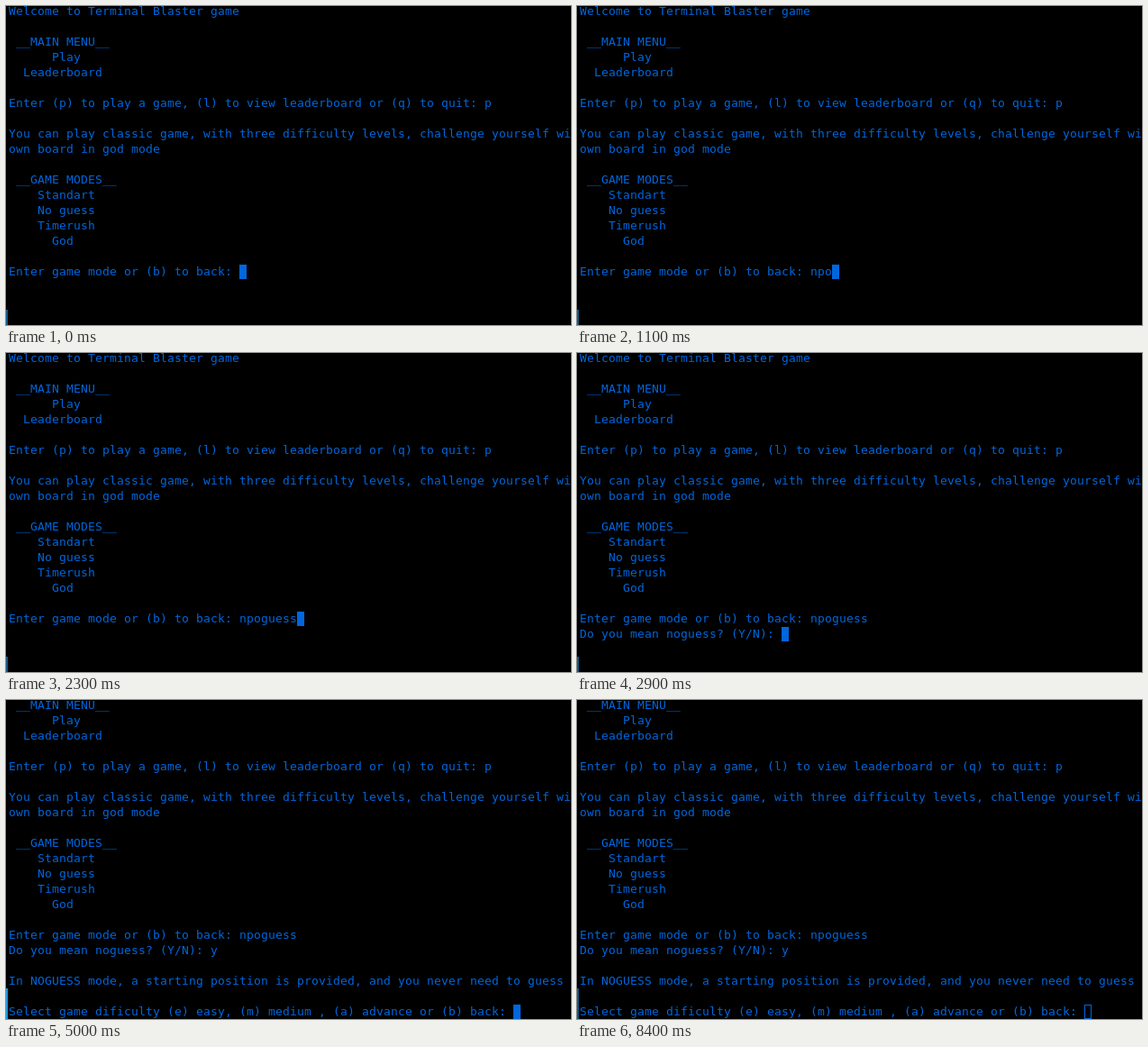
These frames come from a looping animation (627x354 px, 8500 ms). An HTML page with a canvas:

```html
<!DOCTYPE html>
<html lang="en">
<head>
<meta charset="utf-8">
<title>Terminal</title>
<style>
html, body { margin: 0; height: 100%; overflow: hidden; background: #000; }
canvas { display: block; }
</style>
</head>
<body>
<canvas id="screen" width="627" height="354"></canvas>
<script>
const ctx = document.getElementById('screen').getContext('2d');
const LOOP = 8500, CELL = 8, ROW = 17, LEFT = 3, TOP = -2;
const BLUE = '#0066dd';

const menu = `Welcome to Terminal Blaster game

 __MAIN MENU__
      Play
  Leaderboard

Enter (p) to play a game, (l) to view leaderboard or (q) to quit: p

You can play classic game, with three difficulty levels, challenge yourself wi
own board in god mode

 __GAME MODES__
    Standart
    No guess
    Timerush
      God

Enter game mode or (b) to back: `;

// Output appended to the terminal: [time in ms, text]
const events = [
  [0, menu],
  [800, 'n'], [1100, 'po'], [1600, 'g'], [1700, 'u'],
  [1900, 'e'], [2000, 's'], [2300, 's'],
  [2900, '\nDo you mean noguess? (Y/N): '],
  [4200, 'y'],
  [5000, '\n\nIn NOGUESS mode, a starting position is provided, and you never need to guess\n\n' +
    'Select game dificulty (e) easy, (m) medium , (a) advance or (b) back: ']
];

function drawCursor(x, y, hollow) {
  if (hollow) {
    ctx.strokeStyle = BLUE;
    ctx.lineWidth = 1;
    ctx.strokeRect(x + 0.5, y + 0.5, CELL - 1, 15);
  } else {
    ctx.fillRect(x, y, CELL, 16);
  }
}

function draw(t) {
  const lines = events.filter(e => e[0] <= t).map(e => e[1]).join('').split('\n');
  const visible = lines.slice(Math.max(0, lines.length - 21));

  ctx.fillStyle = '#000';
  ctx.fillRect(0, 0, 627, 354);

  const barTop = t < 5000 ? 337 : 320;
  ctx.fillStyle = t >= 5000 && t < 5200 ? '#2196dc' : '#165a87';
  ctx.fillRect(0, barTop, 2, 354 - barTop);

  ctx.fillStyle = BLUE;
  ctx.font = '13px "DejaVu Sans Mono", monospace';
  visible.forEach((line, row) => {
    [...line].forEach((ch, col) => ctx.fillText(ch, LEFT + col * CELL, TOP + row * ROW + 12));
  });

  const last = visible.length - 1;
  drawCursor(LEFT + visible[last].length * CELL, TOP + last * ROW, t >= 8400);
}

let start;
function tick(now) {
  start ??= now;
  draw((now - start) % LOOP);
  requestAnimationFrame(tick);
}
draw(0);
requestAnimationFrame(tick);
</script>
</body>
</html>
```
